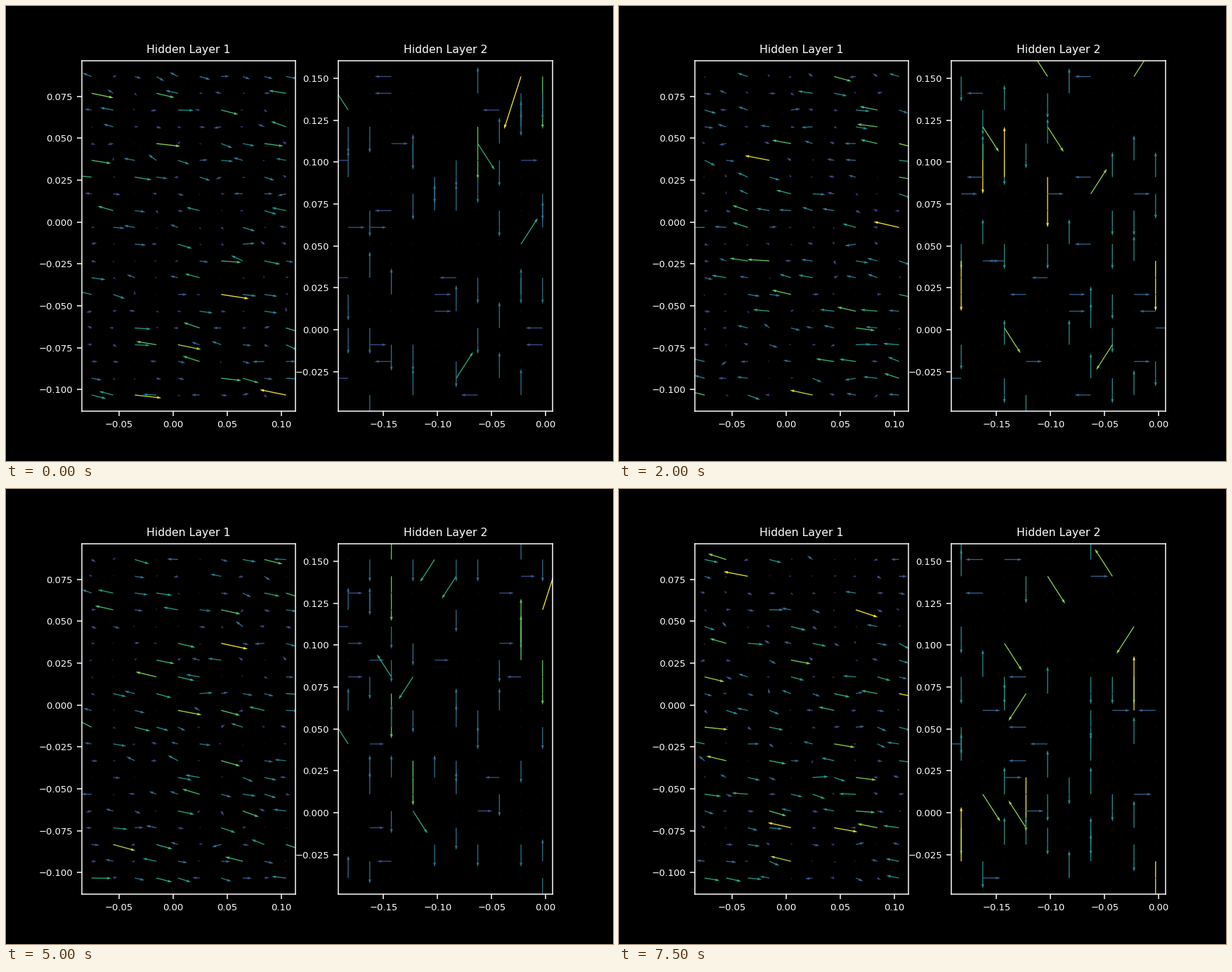
A matplotlib script for the animation above (8 s loop, 864 by 648 pixels).

```python
import matplotlib.pyplot as plt
import numpy as np
from matplotlib.animation import FuncAnimation

STEPS, INTERVAL = 16, 500
COLS, ROWS = 10, 20
SIZE = (ROWS, COLS)
ASPECT = 1.555  # vertical unit relative to horizontal unit


def dense_field(step):
    """Flat, sloping arrows whose main direction swings left, then right."""
    rng = np.random.default_rng(100 + step)
    drift = -0.4 * np.sin(2 * np.pi * (step - 0.7) / STEPS)
    push = rng.normal(drift, 1, SIZE)
    u = push + rng.normal(0, 0.1, SIZE)
    v = -0.2 * push + rng.normal(0, 0.15, SIZE)
    return u, v


def sparse_field(step):
    """Whole-unit arrows on about a third of the grid, mostly vertical."""
    rng = np.random.default_rng(200 + step)
    levels = np.arange(-2, 3)
    u = rng.choice(levels, SIZE, p=[0.005, 0.06, 0.88, 0.055, 0])
    v = rng.choice(levels, SIZE, p=[0.015, 0.15, 0.73, 0.1, 0.005])
    return u, v * ASPECT


def make_panel(ax, title, left, top, field):
    ax.set_title(title)
    x, y = np.meshgrid(left + 0.02 * np.arange(COLS), top - 0.01 * np.arange(ROWS))
    u, v = field(0)
    return ax.quiver(x, y, u, v, np.abs(u) + np.abs(v), cmap="viridis")


plt.style.use("dark_background")
plt.rcParams.update({"font.family": "DejaVu Sans", "font.size": 7})
fig, (ax1, ax2) = plt.subplots(1, 2, figsize=(6.4, 4.8), dpi=135)
layers = [
    (make_panel(ax1, "Hidden Layer 1", -0.0755, 0.0868, dense_field), dense_field),
    (make_panel(ax2, "Hidden Layer 2", -0.1828, 0.1511, sparse_field), sparse_field),
]


def update(step):
    for arrows, field in layers:
        u, v = field(step)
        strength = np.abs(u) + np.abs(v)
        arrows.set_UVC(u, v, strength)
        arrows.set_clim(0, strength.max())
        arrows.scale = None  # fit the lengths to the new mean
    return [arrows for arrows, _ in layers]


anim = FuncAnimation(fig, update, frames=STEPS, interval=INTERVAL, repeat=True)
plt.show()
```
